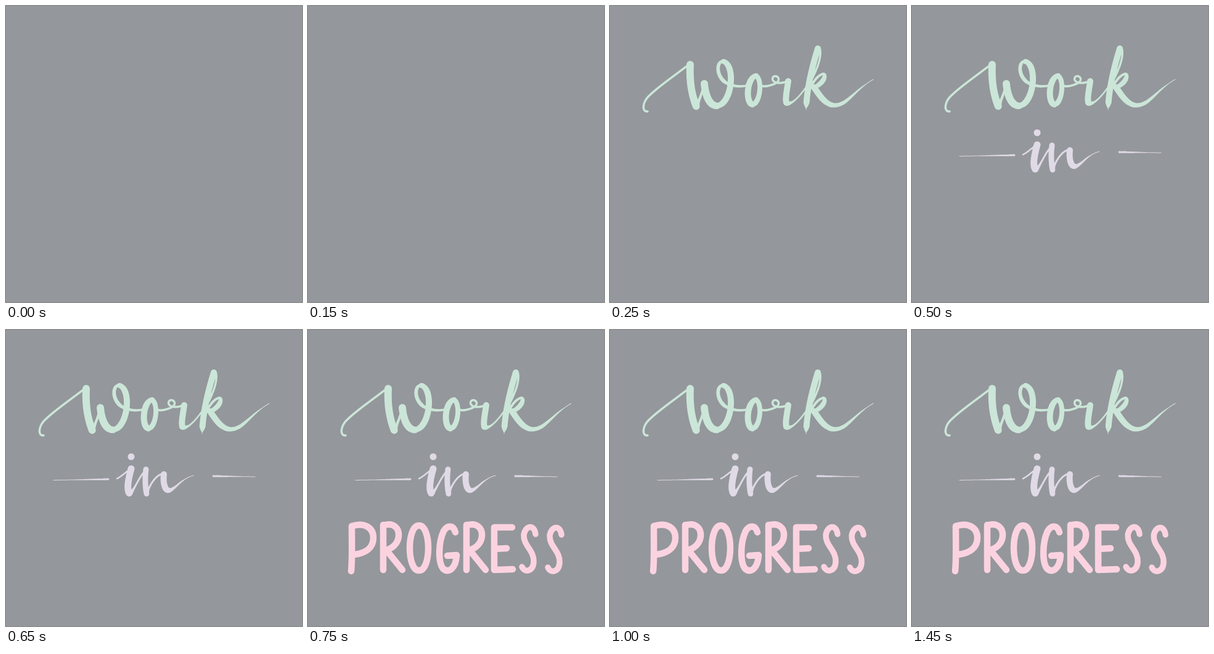
An HTML page with a canvas that plays this animation: 480 by 480 pixels, repeating every 1.75 s.

```html
<!DOCTYPE html>
<html lang="en">
<head>
<meta charset="utf-8">
<title>Work in progress</title>
<style>
  html, body { margin: 0; width: 100%; height: 100%; overflow: hidden; background: #94979b; }
  canvas { display: block; width: 480px; height: 480px; }
</style>
</head>
<body>
<canvas id="stage" role="img" aria-label="Work in progress"></canvas>
<script>
const SIZE = 480, LOOP = 1750, STEP = 250;
const GRAY = '#94979b', MINT = '#cbe6d8', LILAC = '#e0dae7', PINK = '#fbd3e0';

const canvas = document.getElementById('stage');
const ctx = canvas.getContext('2d');
const ratio = window.devicePixelRatio || 1;
canvas.width = canvas.height = SIZE * ratio;
ctx.scale(ratio, ratio);
ctx.lineCap = ctx.lineJoin = 'round';

function dot(shape, x, y, r) {
  shape.moveTo(x + r, y);
  shape.arc(x, y, r, 0, Math.PI * 2);
}

// A pointed pen: it presses on the way down, lifts on the way up,
// follows changes with a slight lag and thins out over the tail.
function pen(shape, d, thin, thick = thin, tail = 0) {
  const line = document.createElementNS('http://www.w3.org/2000/svg', 'path');
  line.setAttribute('d', d);
  const length = line.getTotalLength(), gap = 0.5;
  let width;
  for (let s = 0; s <= length; s += gap) {
    const a = line.getPointAtLength(s);
    const b = line.getPointAtLength(Math.min(length, s + gap));
    const press = Math.min(1, Math.max(0, (b.y - a.y) / gap * 1.2));
    const goal = thin + (thick - thin) * press;
    width = width === undefined ? goal : width + (goal - width) * 0.1;
    const fade = tail ? Math.min(1, (length - s) / tail) : 1;
    dot(shape, a.x, a.y, Math.max(0.5, width * fade / 2));
  }
}

function makeWork() {
  const w = new Path2D();
  // W
  pen(w, 'M61,171 C52,172 52,158 62,147 C78,131 106,112 129,94', 3.6);
  pen(w, 'M130,95 C129,118 131,140 140,163 C146,150 150,138 153,126', 4, 12);
  pen(w, 'M153,126 C155,147 162,162 174,162', 10, 12);
  pen(w, 'M184,90 C204,96 198,158 174,162', 7, 10);
  pen(w, 'M184,89 C171,90 172,117 191,126 C204,132 218,131 229,127', 3.5, 6);
  // o
  pen(w, 'M237,113 C222,116 219,156 231,160', 7, 10);
  pen(w, 'M237,113 C248,121 243,158 231,160', 5, 8);
  // r
  pen(w, 'M240,122 C243,133 254,131 265,127 C279,122 273,112 266,114 C259,119 267,130 288,122', 3.6);
  pen(w, 'M289,122 C287,136 284,150 286,157 C295,162 311,143 323,124', 2.5, 10);
  // k
  pen(w, 'M337,69 C330,92 319,130 318,168', 9, 10, 12);
  pen(w, 'M340,68 C345,82 333,110 323,126', 3.5);
  pen(w, 'M322,140 C327,126 336,112 346,110 C352,113 344,127 331,132', 4, 8);
  pen(w, 'M331,132 C340,145 350,162 366,161 C386,159 397,136 427,119', 6, 10, 65);
  return w;
}

function makeIn() {
  const w = new Path2D();
  // i
  pen(w, 'M180,241 C188,237 196,229 202,225', 2.5);
  pen(w, 'M203,225 C199,240 195,257 200,265 C208,262 214,240 226,228', 3, 11);
  dot(w, 203, 205.5, 5.5);
  // n
  pen(w, 'M227,226 C225,242 226,256 228,266 C234,249 244,234 255,233', 3, 9);
  pen(w, 'M256,234 C254,250 259,262 265,260 C276,257 284,241 304,236', 4, 10, 40);
  // dashes
  pen(w, 'M166,242 L77,243.5', 3.5, 3.5, 110);
  pen(w, 'M336,237 L404,238', 2.8, 2.8, 60);
  return w;
}

const letterR = x => `M${x},316 v73 m0,-72 c17,-6 26,5 25,17 c-1,13 -11,20 -20,23 l26,32`;
const letterS = (x, y) => `M${x},${y} c-2,-16 -16,-15 -19,1 c-1,18 17,25 16,44 c-1,16 -15,18 -19,8`;

const progress = new Path2D([
  'M71,319 C71,345 72,370 70,391 M71,318 C92,311 106,321 106,337 C106,354 92,362 76,364',
  letterR(122),
  'M180,317 C160,317 160,390 180,390 C200,390 200,317 180,317 Z',
  'M239,328 C236,316 226,316 220,326 C211,345 211,377 219,387 C229,396 240,385 241,365 L226,366',
  letterR(257),
  'M331,320 L302,320 V389 L332,388 M302,355 L322,354'
].join(' '));
const curls = new Path2D(letterS(369, 331) + letterS(411, 332));

const work = makeWork(), inWord = makeIn();

function fill(shape, color) {
  ctx.fillStyle = color;
  ctx.fill(shape);
}

function stroke(shape, color, width) {
  ctx.strokeStyle = color;
  ctx.lineWidth = width;
  ctx.stroke(shape);
}

// One more word appears at each step, then the full lettering rests.
function draw(now) {
  const step = Math.floor((now % LOOP) / STEP);
  ctx.fillStyle = GRAY;
  ctx.fillRect(0, 0, SIZE, SIZE);
  if (step >= 1) fill(work, MINT);
  if (step >= 2) fill(inWord, LILAC);
  if (step >= 3) {
    stroke(progress, PINK, 10.5);
    stroke(curls, PINK, 9.5);
  }
}

function tick() {
  draw(performance.now());
  requestAnimationFrame(tick);
}
tick();
</script>
</body>
</html>
```
